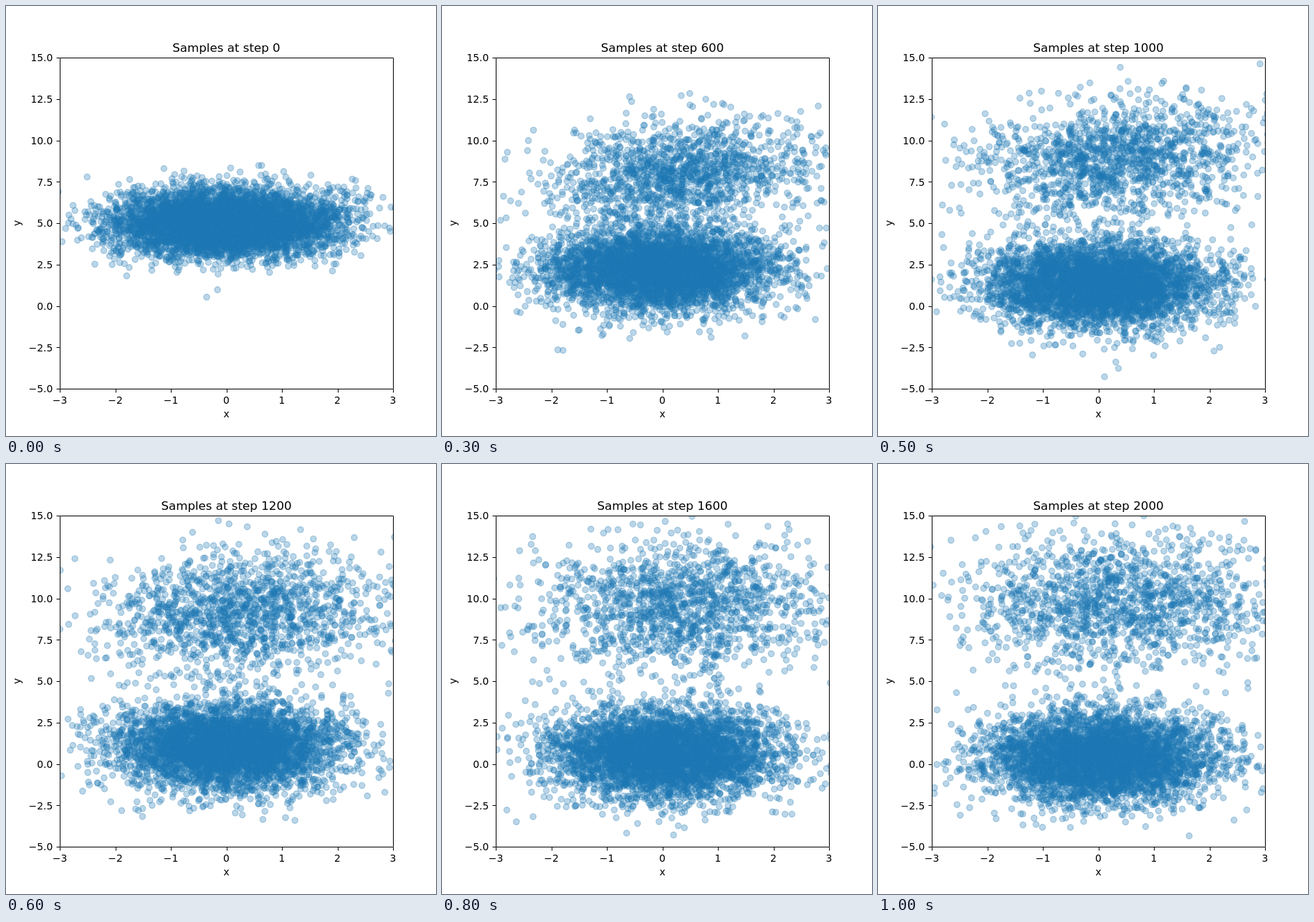
Write an HTML page with a canvas that moves like this. It is 600 px wide and 600 px high and loops after 1100 ms.

```html
<!DOCTYPE html>
<html lang="en">
<head>
<meta charset="utf-8">
<title>Samples</title>
<style>
  html, body { margin: 0; width: 100%; height: 100%; overflow: hidden; background: #fff; }
  canvas, svg { position: absolute; left: 0; top: 0; width: 600px; height: 600px; }
  text { font: 13.89px "DejaVu Sans", sans-serif; fill: #000; text-anchor: middle; }
  #title { font-size: 16.67px; }
  .ytick { text-anchor: end; }
  path { fill: none; stroke: #000; stroke-width: 1; }
</style>
</head>
<body>
<canvas id="plot" width="600" height="600"></canvas>
<svg id="axes" viewBox="0 0 600 600">
  <text id="title" x="307.5" y="64"></text>
  <text x="307.5" y="574">x</text>
  <text transform="translate(20 303) rotate(-90)">y</text>
</svg>
<script>
const LEFT = 75, RIGHT = 540, TOP = 72, BOTTOM = 534;
const COUNT = 6000, STEPS = 11, STEP_MS = 100, STEP_SIZE = 200;
const px = x => LEFT + (x + 3) * (RIGHT - LEFT) / 6;
const py = y => BOTTOM - (y + 5) * (BOTTOM - TOP) / 20;

const svg = document.getElementById('axes');
const title = document.getElementById('title');
const ctx = document.getElementById('plot').getContext('2d');

function add(tag, attrs, text = '') {
  const el = document.createElementNS('http://www.w3.org/2000/svg', tag);
  for (const key in attrs) el.setAttribute(key, attrs[key]);
  el.textContent = text;
  svg.appendChild(el);
}

function drawAxes() {
  let d = `M${LEFT + .5} ${TOP + .5}H${RIGHT + .5}V${BOTTOM + .5}H${LEFT + .5}Z`;
  const label = (v, digits) => v.toFixed(digits).replace('-', '\u2212');
  for (let x = -3; x <= 3; x++) {
    d += `M${Math.round(px(x)) + .5} ${BOTTOM + 1}v4.5`;
    add('text', { x: px(x), y: 555 }, label(x, 0));
  }
  for (let y = -5; y <= 15; y += 2.5) {
    d += `M${LEFT} ${Math.round(py(y)) + .5}h-4.5`;
    add('text', { x: 65.3, y: Math.round(py(y) + 5.3), class: 'ytick' }, label(y, 1));
  }
  add('path', { d });
}

let seed = 20177;
function random() {
  seed = (seed + 0x6D2B79F5) | 0;
  let t = Math.imul(seed ^ (seed >>> 15), 1 | seed);
  t = (t + Math.imul(t ^ (t >>> 7), 61 | t)) ^ t;
  return ((t ^ (t >>> 14)) >>> 0) / 4294967296;
}
const gauss = () =>
  Math.sqrt(-2 * Math.log(1 - random())) * Math.cos(2 * Math.PI * random());

// Each sample diffuses around the mean of the mode it is drawn to.
function simulate() {
  const frames = Array.from({ length: STEPS }, () => []);
  const keep = Math.exp(-STEP_SIZE / 750), kick = Math.sqrt(1 - keep * keep);
  for (let i = 0; i < COUNT; i++) {
    let u = gauss(), v = gauss();
    const upper = random() < .25 + .08 * u;
    for (let k = 0; k < STEPS; k++) {
      const e = Math.exp(-k * STEP_SIZE / 700);
      const tilt = 1.4 * e * (1 - e);
      frames[k].push(upper
        ? [.3 * (1 - e) + (1.35 - .35 * e) * u, 10.1 - 5.1 * e + (2.05 - 1.05 * e) * v + tilt * u]
        : [.05 * (1 - e) + u, .1 + 4.9 * e + (1.4 - .4 * e) * v]);
      u = keep * u + kick * gauss();
      v = keep * v + kick * gauss();
    }
  }
  return frames;
}

const frames = simulate();

function drawSamples(k) {
  ctx.clearRect(0, 0, 600, 600);
  ctx.save();
  ctx.beginPath();
  ctx.rect(LEFT, TOP, RIGHT - LEFT + 1, BOTTOM - TOP + 1);
  ctx.clip();
  ctx.fillStyle = ctx.strokeStyle = 'rgba(31, 119, 180, .3)';
  ctx.lineWidth = 1.39;
  for (const [x, y] of frames[k]) {
    ctx.beginPath();
    ctx.arc(px(x), py(y), 4.17, 0, 2 * Math.PI);
    ctx.fill();
    ctx.stroke();
  }
  ctx.restore();
  title.textContent = `Samples at step ${k * STEP_SIZE}`;
}

let shown = -1;
const start = performance.now();
function tick() {
  const k = Math.floor((performance.now() - start) / STEP_MS) % STEPS;
  if (k !== shown) drawSamples(shown = k);
  requestAnimationFrame(tick);
}

drawAxes();
tick();
</script>
</body>
</html>
```
